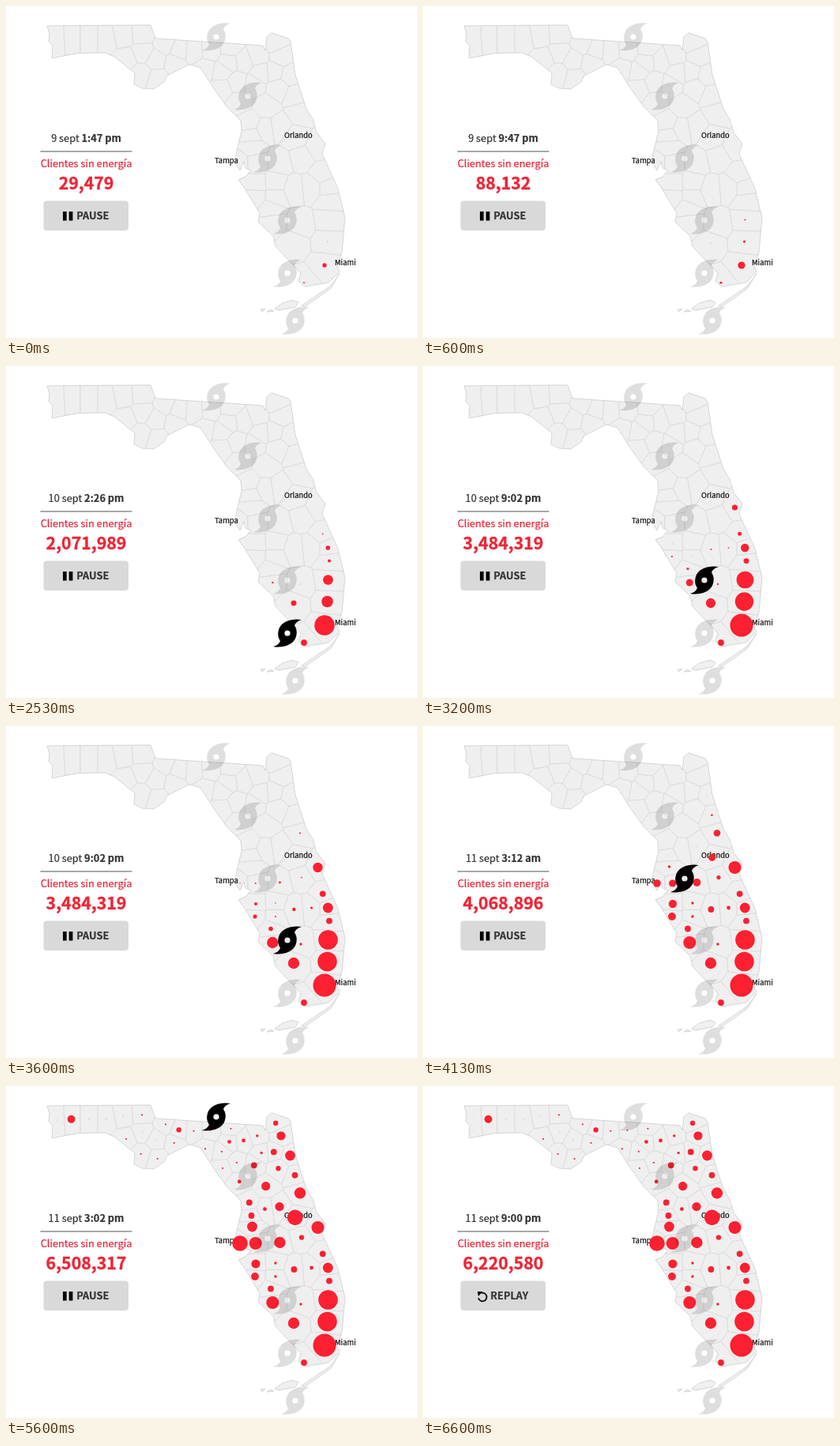
Write an HTML page with a canvas that moves like this. It is 520 px wide and 420 px high and loops after 8330 ms.

```html
<!DOCTYPE html>
<html lang="es">
<head>
<meta charset="utf-8">
<title>Clientes sin energía</title>
<style>
  html, body { margin: 0; width: 100%; height: 100%; overflow: hidden; background: #fff; }
  canvas { display: block; }
</style>
</head>
<body>
<canvas id="stage" width="520" height="420"></canvas>
<script>
const WIDTH = 520, HEIGHT = 420;
const ctx = document.getElementById('stage').getContext('2d');
const SANS = '"Noto Sans CJK JP", "Noto Sans CJK SC", "Noto Sans CJK", "Open Sans", sans-serif';
const DOT_RED = '#fc2030', TEXT_RED = '#ee2435', DARK = '#333';

// Time runs in steps of 1/15 s.
const STEPS_PER_MS = 15 / 1000, LOOP_STEPS = 125, MOVE_STEPS = 4;

// Outages begin where exposure passes `front` and peak where it reaches `full`.
const stages = [
  { at: 0,  front: 302, full: 500, day: '9 sept',  hour: '1:47 pm', total: 29479 },
  { at: 6,  front: 290, full: 440, day: '9 sept',  hour: '9:47 pm', total: 88132 },
  { at: 16, front: 280, full: 400, day: '10 sept', hour: '5:47 am', total: 381429 },
  { at: 28, front: 250, full: 350, day: '10 sept', hour: '9:10 am', total: 983206, storm: 0 },
  { at: 38, front: 200, full: 315, day: '10 sept', hour: '2:26 pm', total: 2071989, storm: 1 },
  { at: 48, front: 170, full: 275, day: '10 sept', hour: '9:02 pm', total: 3484319, storm: 2 },
  { at: 58, front: 140, full: 215, day: '11 sept', hour: '3:12 am', total: 4068896, storm: 3 },
  { at: 69, front: -200, full: -100, day: '11 sept', hour: '9:04 am', total: 6210402, storm: 4 },
  { at: 80, front: -200, full: -100, day: '11 sept', hour: '3:02 pm', total: 6508317, storm: 5 },
  { at: 90, front: -200, full: -100, day: '11 sept', hour: '9:00 pm', total: 6220580, done: true }
];

const storms = [[366, 398], [356, 338], [356, 271], [331, 193], [306, 114], [266, 39]];
const cities = [['Orlando', 352, 166.5], ['Tampa', 264, 199.2], ['Miami', 416, 328]];

// County centres grouped by peak radius; the county borders follow from them.
const countyGroups = [
  { peak: 14.5, centres: [[403, 328]] },
  { peak: 12.3, centres: [[406.5, 298], [407.5, 270.5]] },
  { peak: 9.8, centres: [[296, 199], [365.7, 166.4]] },
  { peak: 8, centres: [[394.5, 179], [315.7, 199], [337.3, 274]] },
  { peak: 7.2, centres: [[346.5, 198], [372, 135.5], [364, 300]] },
  { peak: 6.4, centres: [[311.5, 178], [359.5, 88], [407.3, 230]] },
  { peak: 5.6, centres: [[346, 152.6], [328.7, 126.7], [316, 225], [348, 63]] },
  { peak: 4.9, centres: [[315, 241], [82.6, 42]] },
  { peak: 3.9, centres: [[335, 256.5], [364.4, 232], [409, 246.6], [400.7, 212.3], [310.5, 164],
    [307.8, 147.4], [338.8, 83.4], [313.8, 100.3], [377, 350], [365.5, 112.8]] },
  { peak: 3.2, centres: [[374, 191.6], [341.2, 47], [344.5, 104.3], [218.7, 55.5]] },
  { peak: 2.4, centres: [[327.5, 155.7], [300.6, 69], [282.5, 70.6], [295.2, 121], [386.6, 230]] },
  { peak: 1.7, centres: [[341, 241], [341, 224], [373, 276], [323.2, 84.6], [317.8, 63]] },
  { peak: 1.1, centres: [[252, 79.4], [284.5, 54], [237.5, 57], [212.6, 72], [202, 48.5], [170.6, 86],
    [191.7, 92], [274, 104], [292, 97], [258.5, 56], [273, 83], [172, 36.6], [152, 67]] },
  { peak: 0.4, centres: [[190, 68], [173, 58.6], [65, 43], [105, 42], [127, 42], [148, 38]] }
];
const counties = countyGroups.flatMap(({ peak, centres }) =>
  centres.map(([x, y]) => ({ x, y, peak, exposure: exposure(x, y) })));

const northBorder = 'M52 25L183 24L189 41L325 50L328 56L330 39L336 34L357 41L360 45';
const eastCoast = 'L366 87L380 130L388 143L393 160L404 174L400 187L420 231L429 268L425 312L419 329L422 336L408 350L378 355';
const westCoast = 'L370 348L373 338L341 304L338 291L319 273L321 262L301 229L294 220L303 216L310 208L303 205' +
  'L301 197L296 208L289 196L298 158L297 145L279 127L262 103L246 78L232 74L204 88L200 96';
const gulfCoast = 'L187 105L172 104L162 99L163 85L137 64L125 59L90 60L58 66L59 50L54 45L55 35Z';
const keys = 'M422 338L411 357L396 368L378 380L374 379L408 356L417 346Z' +
  'M340 383L349 376L363 372L370 375L366 381L345 385ZM330 387L334 384L339 386ZM322 384L328 383L324 387Z';
const land = new Path2D(northBorder + eastCoast + westCoast + gulfCoast + keys);
const borders = new Path2D();
counties.forEach(addBorder);

const stormShape = new Path2D(
  'M18 -17C6 -19 -6 -15 -10 -7C-13 0 -12 5 -9 10C-11 14 -14 16 -18 17' +
  'C-6 19 6 15 10 7C13 0 12 -5 9 -10C11 -14 14 -16 18 -17Z' +
  'M3.6 0A3.6 3.6 0 1 0 -3.6 0A3.6 3.6 0 1 0 3.6 0Z');

function clamp01(v) { return Math.max(0, Math.min(1, v)); }
function mix(a, b, k) { return a + (b - a) * k; }
function easeInOut(k) { return k < 0.5 ? 4 * k ** 3 : 1 - 4 * (1 - k) ** 3; }

// The storm comes from the south and is felt first on the Atlantic side.
function exposure(x, y) {
  const coastX = 360 + 0.36 * (y - 65);
  return y + 0.3 * (x - 370) + 80 * clamp01(1 - (coastX - x) / 35);
}

// Keeps the part of a polygon that is nearer to a than to b.
function nearerPart(polygon, a, b) {
  const dx = b.x - a.x, dy = b.y - a.y;
  const side = ([x, y]) => (x - (a.x + b.x) / 2) * dx + (y - (a.y + b.y) / 2) * dy;
  return polygon.flatMap((p, i) => {
    const q = polygon[(i + 1) % polygon.length];
    const sp = side(p), sq = side(q), kept = sp <= 0 ? [p] : [];
    if (sp * sq < 0) {
      const k = sp / (sp - sq);
      kept.push([mix(p[0], q[0], k), mix(p[1], q[1], k)]);
    }
    return kept;
  });
}

function addBorder(county) {
  let cell = [[0, 0], [WIDTH, 0], [WIDTH, HEIGHT], [0, HEIGHT]];
  for (const other of counties) {
    if (other !== county) cell = nearerPart(cell, county, other);
  }
  cell.forEach(([x, y], i) => i ? borders.lineTo(x, y) : borders.moveTo(x, y));
  borders.closePath();
}

// A hairline outline gives the text its slightly heavier look.
function write(text, x, y, size, color, weight = 400, align = 'left') {
  ctx.font = `${weight} ${size}px ${SANS}`;
  ctx.textAlign = align;
  ctx.fillStyle = ctx.strokeStyle = color;
  ctx.lineWidth = size / 60;
  ctx.fillText(text, x, y);
  ctx.strokeText(text, x, y);
}

function drawMap() {
  ctx.lineJoin = 'round';
  ctx.fillStyle = '#efefef';
  ctx.fill(land);
  ctx.save();
  ctx.clip(land);
  ctx.lineWidth = 0.4;
  ctx.strokeStyle = '#d0d0d0';
  ctx.stroke(borders);
  ctx.restore();
  ctx.lineWidth = 0.7;
  ctx.strokeStyle = '#c8c8c8';
  ctx.stroke(land);
  cities.forEach(([name, x, y]) => write(name, x, y, 9.4, '#000'));
}

function drawOutages(from, to, k) {
  const level = (county, { front, full }) => clamp01((county.exposure - front) / (full - front));
  ctx.fillStyle = DOT_RED;
  for (const county of counties) {
    const radius = county.peak * mix(level(county, from), level(county, to), k);
    ctx.beginPath();
    ctx.arc(county.x, county.y, radius, 0, 2 * Math.PI);
    ctx.fill();
  }
}

function drawStorms(active) {
  storms.forEach(([x, y], i) => {
    ctx.save();
    ctx.translate(x, y);
    ctx.fillStyle = i === active ? '#000' : 'rgba(0, 0, 0, 0.13)';
    ctx.fill(stormShape, 'evenodd');
    ctx.restore();
  });
}

function drawDate(day, hour) {
  const size = 12.8, lead = day + ' ';
  ctx.font = `400 ${size}px ${SANS}`;
  const leadWidth = ctx.measureText(lead).width;
  ctx.font = `700 ${size}px ${SANS}`;
  const x = 101.5 - (leadWidth + ctx.measureText(hour).width) / 2;
  write(lead, x, 172, size, DARK);
  write(hour, x + leadWidth, 172, size, DARK, 700);
}

function drawReplayIcon() {
  ctx.fillStyle = ctx.strokeStyle = '#000';
  ctx.lineWidth = 1.8;
  ctx.beginPath();
  ctx.arc(75.3, 267, 5.3, -1.9, 2.9);
  ctx.stroke();
  ctx.fill(new Path2D('M69 260H75.5L70 266Z'));
}

function drawPauseIcon() {
  ctx.fillStyle = '#000';
  ctx.fillRect(72, 260, 4.7, 11.5);
  ctx.fillRect(79.7, 260, 4.7, 11.5);
}

function drawButton(done) {
  ctx.fillStyle = '#d9d9d9';
  ctx.beginPath();
  ctx.roundRect(47.5, 246.5, 107.5, 37.5, 4);
  ctx.fill();
  if (done) drawReplayIcon(); else drawPauseIcon();
  write(done ? 'REPLAY' : 'PAUSE', done ? 85.3 : 89.2, 270, 12.8, DARK, 700);
}

function drawPanel({ day, hour, total, done }) {
  drawDate(day, hour);
  ctx.fillStyle = '#555';
  ctx.fillRect(43.5, 183.5, 116, 1);
  write('Clientes sin energía', 101.5, 204, 12.8, TEXT_RED, 400, 'center');
  write(total.toLocaleString('en-US'), 101.5, 232, 21.3, TEXT_RED, 700, 'center');
  drawButton(done);
}

function draw(step) {
  const index = stages.findLastIndex(s => s.at <= step);
  const stage = stages[index];
  const previous = stages[Math.max(0, index - 1)];
  const k = easeInOut(clamp01((step - stage.at + 0.5) / MOVE_STEPS));
  ctx.fillStyle = '#fff';
  ctx.fillRect(0, 0, WIDTH, HEIGHT);
  drawMap();
  drawOutages(previous, stage, k);
  drawStorms(stage.storm);
  drawPanel(stage);
}

const start = performance.now();
function tick() {
  const elapsed = performance.now() - start;
  draw(Math.floor(elapsed * STEPS_PER_MS + 0.05) % LOOP_STEPS);
  requestAnimationFrame(tick);
}
tick();
</script>
</body>
</html>
```
